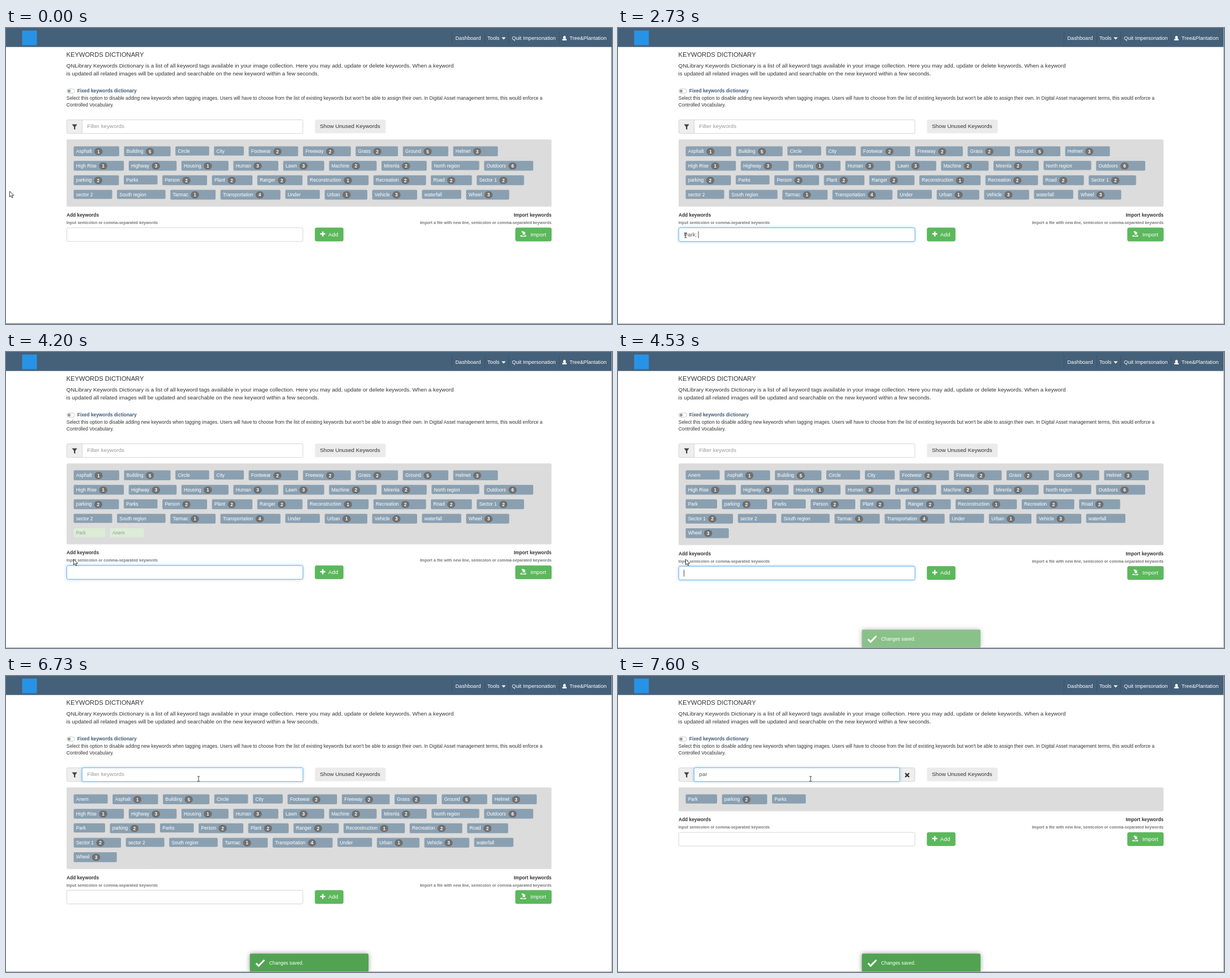
These frames come from a looping animation (1070 px wide and 524 px high, 8000 ms). An HTML page:

```html
<!DOCTYPE html>
<html lang="en">
<head>
<meta charset="utf-8">
<title>Keywords dictionary</title>
<style>
  html, body { margin: 0; width: 100%; height: 100%; overflow: hidden; background: #fff; }
  svg { display: block; width: 1070px; height: 524px; }
  text { font: 9.75px "Liberation Sans", Arial, sans-serif; fill: #333; }
  .nav text { font-size: 9.17px; fill: #fff; }
  .small { font-size: 8.36px; }
  .bold { font-size: 8.36px; font-weight: bold; }
  .hint { font-size: 7.12px; font-weight: bold; fill: #777; }
  .end { text-anchor: end; }
  .white { fill: #fff; }
  .field { fill: #fff; stroke: #ccc; stroke-width: .8; }
  .addon { fill: #eee; stroke: #ccc; stroke-width: .8; }
  .focus { fill: #fff; stroke: #66afe9; stroke-width: .9; filter: drop-shadow(0 0 2.6px rgba(102,175,233,.6)); }
  .button { fill: #5cb85c; stroke: #4cae4c; stroke-width: .7; }
  .typed { fill: #555; }
  .caret { stroke: #333; stroke-width: .9; }
  .tag { fill: #8aa0b1; }
  .pending { fill: #dcecd7; }
  .pending-label { font-size: 8.36px; fill: #8d9f96; }
  .badge { fill: #707070; }
  .count { font-size: 8.36px; font-weight: bold; fill: #fff; text-anchor: middle; }
  #toast rect { fill: #51a351; filter: drop-shadow(0 0 4px #999); }
</style>
</head>
<body>
<svg viewBox="0 0 1070 524">
  <g class="nav">
    <rect width="1070" height="33.6" fill="#456079"/>
    <path d="M787.5 6v23M845.5 6v23M887.5 6v23M976.5 6v23" stroke="#3c546b" stroke-width=".8"/>
    <rect x="28.5" y="4.5" width="26" height="26" fill="#2793e6"/>
    <text x="793.5" y="21.3">Dashboard</text>
    <text x="850" y="21.3">Tools</text>
    <path d="M875 16.6h7.4l-3.7 4z" fill="#fff"/>
    <text x="893.3" y="21.3">Quit Impersonation</text>
    <path d="M982.2 22v-1.4q0-1.4 2.5-2.1a2.3 2.6 0 1 1 2.8 0q2.4.7 2.4 2.1v1.4z" fill="#fff"/>
    <text x="995" y="21.3">Tree&amp;Plantation</text>
  </g>

  <text x="106.6" y="50.7" style="font-size:11.17px">KEYWORDS DICTIONARY</text>
  <text x="106.6" y="70.4" style="font-size:9.8px">QNLibrary Keywords Dictionary is a list of all keyword tags available in your image collection. Here you may add, update or delete keywords. When a keyword</text>
  <text x="106.6" y="84.4">is updated all related images will be updated and searchable on the new keyword within a few seconds.</text>

  <rect x="107.4" y="107.8" width="14" height="7.6" rx="3.8" fill="#fff" stroke="#bbb" stroke-width=".8"/>
  <circle cx="111.4" cy="111.6" r="2.6" fill="#999"/>
  <text class="bold" x="125.8" y="114.2" style="fill:#3f5b74">Fixed keywords dictionary</text>
  <text x="106.8" y="127.2" style="font-size:8.39px">Select this option to disable adding new keywords when tagging images. Users will have to choose from the list of existing keywords but won't be able to assign their own. In Digital Asset management terms, this would enforce a</text>
  <text class="small" x="106.8" y="138.6">Controlled Vocabulary.</text>

  <rect class="addon" x="107.3" y="162.5" width="30" height="24.2" rx="2.5"/>
  <path d="M116.5 170.5h9.2l-3.4 4.6v5.2l-2.3-1.6v-3.6z" fill="#444"/>
  <g id="clear">
    <rect class="addon" x="490" y="162.5" width="34.2" height="24.2" rx="2.5"/>
    <path d="M507.2 172l6.8 6.8m0-6.8l-6.8 6.8" stroke="#333" stroke-width="2.4"/>
  </g>
  <rect class="field filter-box" x="134.4" y="162.5" width="389.8" height="24.2" rx="1.5"/>
  <rect class="focus filter-box" id="filterFocus" x="134.4" y="162.5" width="389.8" height="24.2" rx="1.5"/>
  <text id="placeholder" x="143.3" y="177.4" style="fill:#999">Filter keywords</text>
  <text class="typed" id="filterText" x="143.3" y="177.4"></text>
  <path class="caret" id="filterCaret" d="M0 168v12"/>
  <rect x="545.5" y="162.2" width="124.8" height="24" rx="2.5" fill="#ebebeb"/>
  <text x="554.3" y="177.4">Show Unused Keywords</text>

  <g id="lists"></g>

  <g id="form">
    <text class="bold" x="107" y="334">Add keywords</text>
    <text class="hint" x="106.8" y="347">Input semicolon or comma-separated keywords</text>
    <text class="bold end" x="963.2" y="334">Import keywords</text>
    <text class="hint end" x="963.2" y="347">Import a file with new line, semicolon or comma-separated keywords</text>
    <rect class="field" x="107.3" y="353.7" width="416.9" height="24.2" rx="2.5"/>
    <rect class="focus" id="addFocus" x="107.3" y="353.7" width="416.9" height="24.2" rx="2.5"/>
    <text class="typed" id="addText" x="116.5" y="369.2"></text>
    <path class="caret" id="addCaret" d="M0 360v12"/>
    <rect class="button" x="545.8" y="353.8" width="49.6" height="23.5" rx="2.5"/>
    <path d="M559.3 360.2v8.8m-4.4-4.4h8.8" stroke="#fff" stroke-width="2.5"/>
    <text class="white" x="569" y="368.6">Add</text>
    <rect class="button" x="899.7" y="353.8" width="63.3" height="23.5" rx="2.5"/>
    <path d="M908.3 369.3v-2.2h2.4l1 1h3.6l1-1h2.1v2.2zM910 360l3-.6 2.2 2 1.4-1v5.4h-5.2l1.6-1.6z" fill="#fff"/>
    <text class="white" x="926" y="368.6">Import</text>
  </g>

  <g id="toast">
    <rect x="430.6" y="491.6" width="209.4" height="32.4" rx="2"/>
    <path d="M441.5 508.5l4.6 4.6 10-10.3" fill="none" stroke="#fff" stroke-width="3"/>
    <text class="small white" x="464.8" y="510.6">Changes saved.</text>
  </g>

  <path id="edge" d="M1069.5 0v523.5H0" fill="none"/>
  <path id="arrow" d="M0 0v10l2.3-2.1 1.7 3.7 1.6-.8-1.6-3.5h3.2z" fill="#fff" stroke="#222" stroke-width=".9"/>
  <path id="beam" d="M-2.2-4.2h1.6l.6.5.6-.5h1.6M0-3.7v7.6M-2.2 4.4h1.6l.6-.5.6.5h1.6" fill="none" stroke="#222" stroke-width=".9"/>
</svg>

<script>
const $ = id => document.getElementById(id);
const STEP = 200 / 3, LOOP = 8000;
const ADDED = ['Park', 'Anem'];
const KEYWORDS = ('Anem,Asphalt:1,Building:5,Circle,City,Footwear:2,Freeway:2,Grass:2,Ground:5,Helmet:3,' +
  'High Rise:1,Highway:3,Housing:1,Human:3,Lawn:3,Machine:2,Mirenla:2,North region,Outdoors:6,' +
  'Park,parking:2,Parks,Person:2,Plant:2,Ranger:2,Reconstruction:1,Recreation:2,Road:2,Sector 1:2,' +
  'sector 2,South region,Tarmac:1,Transportation:4,Under,Urban:1,Vehicle:3,waterfall,Wheel:3')
  .split(',').map(entry => {
    const [name, count] = entry.split(':');
    return { name, count };
  });

const pen = document.createElement('canvas').getContext('2d');
function textWidth(text, size) {
  pen.font = size + 'px "Liberation Sans", Arial, sans-serif';
  return pen.measureText(text).width;
}

function add(parent, name, attrs, content = '') {
  const node = document.createElementNS('http://www.w3.org/2000/svg', name);
  for (const key in attrs) node.setAttribute(key, attrs[key]);
  node.textContent = content;
  return parent.appendChild(node);
}

// Flows tags into rows and sizes the grey panel around them.
function buildList(tags) {
  const node = add($('lists'), 'g', {});
  const panel = add(node, 'rect', { x: 107, y: 197.3, width: 856.2, rx: 2, fill: '#dcdcdc' });
  let x = 119.5, y = 209.6, bottom = 0;
  for (const { name, count, pending } of tags) {
    const label = textWidth(name, 8.36);
    const width = label + (count ? 52.5 : 38.3), height = count ? 17.4 : 16.2;
    if (x + width > 950) {
      x = 119.5;
      y += 25.6;
      bottom = 0;
    }
    add(node, 'rect', { class: pending ? 'pending' : 'tag', x, y, width, height, rx: 1.8 });
    add(node, 'text', { class: pending ? 'pending-label' : 'small white', x: x + 4.3, y: y + 11.3 }, name);
    if (count) {
      const center = x + label + 16;
      add(node, 'rect', { class: 'badge', x: center - 7.2, y: y + 2.7, width: 14.4, height: 12.6, rx: 6.3 });
      add(node, 'text', { class: 'count', x: center, y: y + 12 }, count);
    }
    bottom = Math.max(bottom, y + height);
    x += width + 8.55;
  }
  panel.setAttribute('height', bottom + 12.4 - 197.3);
  return { node, bottom };
}

const initial = KEYWORDS.filter(tag => !ADDED.includes(tag.name));
const lists = [
  initial,
  [...initial, ...ADDED.map(name => ({ name, pending: true }))],
  KEYWORDS,
  KEYWORDS.filter(tag => tag.name.toLowerCase().includes('pa'))
].map(buildList);

const MOVES = [
  [133, 800, 6.5, 289, 124, 365],
  [1000, 1267, 124, 365, 119.4, 366.8],
  [5133, 5333, 119.4, 366.8, 521, 386],
  [5533, 6333, 521, 386, 340, 182]
];

const clamp = value => Math.min(1, Math.max(0, value));
const ramp = (t, from, to) => clamp((t - from) / (to - from));
const within = (t, ...spans) => spans.some(([from, to]) => t >= from && t < to);
const show = (node, visible) => { node.style.display = visible ? '' : 'none'; };
const typed = (t, text, keys) => text.slice(0, keys.filter(key => t >= key).length);

function pointer(t) {
  const [from, to, x0, y0, x1, y1] = MOVES.filter(move => t >= move[0]).pop() || MOVES[0];
  const p = ramp(t, from, to), eased = p * p * (3 - 2 * p);
  return [x0 + (x1 - x0) * eased, y0 + (y1 - y0) * eased];
}

function setField(prefix, x, text, caretOn) {
  $(prefix + 'Text').textContent = text;
  show($(prefix + 'Caret'), caretOn);
  $(prefix + 'Caret').setAttribute('transform', `translate(${x + textWidth(text, 9.75) + .1} 0)`);
}

function render(time) {
  const t = Math.floor((time + 5) / STEP) * STEP + 1;
  const current = t < 4130 ? 0 : t < 4400 ? 1 : t < 6930 ? 2 : 3;
  lists.forEach((list, i) => show(list.node, i === current));
  const shift = lists[current].bottom - lists[0].bottom;
  $('form').setAttribute('transform', `translate(0 ${shift})`);

  const entry = t < 4130
    ? typed(t, 'Park; Anem', [1330, 1530, 1870, 2270, 2530, 2730, 3000, 3400, 3530, 3665]) : '';
  setField('add', 116.5, entry, within(t, [1130, 4130], [4400, 4865], [5330, 5800]));
  $('addFocus').style.opacity = ramp(t, 1000, 1200) - ramp(t, 6330, 6530);

  const query = typed(t, 'par', [6800, 6930, 7265]);
  setField('filter', 143.3, query, within(t, [6400, 6730], [6800, 7600]));
  $('filterFocus').style.opacity = ramp(t, 6330, 6530);
  show($('placeholder'), !query);
  show($('clear'), query);
  for (const box of document.querySelectorAll('.filter-box')) {
    box.setAttribute('width', query ? 362.8 : 389.8);
  }

  $('toast').style.opacity = ramp(t, 4400, 4600);
  $('edge').style.stroke = t < 1000 ? '#4d6475' : '#aaa';

  const [x, y] = pointer(t);
  const overAdd = x > 107 && x < 524 && y > 353.5 + shift && y < 378 + shift;
  const overFilter = x > 134 && x < 524 && y > 162 && y < 187;
  const isBeam = overAdd || overFilter;
  show($('beam'), isBeam);
  show($('arrow'), !isBeam);
  $(isBeam ? 'beam' : 'arrow').setAttribute('transform', `translate(${x} ${y})`);
}

function tick() {
  render(performance.now() % LOOP);
  requestAnimationFrame(tick);
}
tick();
</script>
</body>
</html>
```
